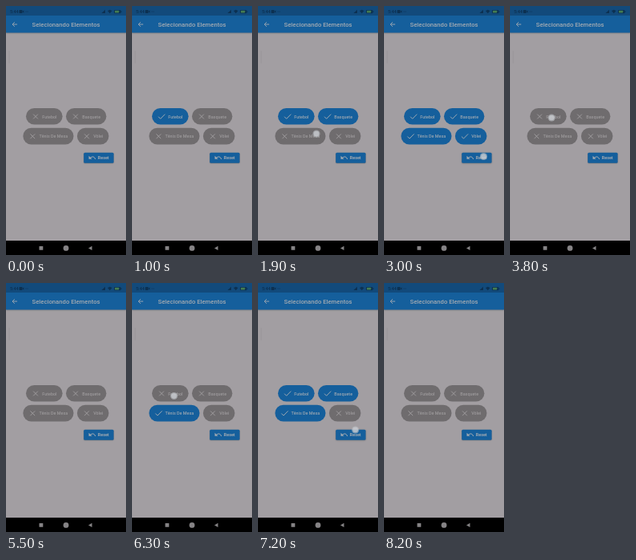
An HTML page with a canvas that plays this animation: 150x312 px, repeating every 8.3 s.

```html
<!DOCTYPE html>
<html lang="pt">
<head>
<meta charset="utf-8">
<style>
html, body { margin: 0; width: 100%; height: 100%; overflow: hidden; background: #a29ea2; }
canvas { display: block; width: 150px; height: 312px; }
</style>
</head>
<body>
<canvas id="stage"></canvas>
<script>
const LOOP = 8300, STEP = 100, FADE = 200;
const BLUE = [21, 95, 156], GREY = [111, 108, 110], PALE = '#a2aab2';
const canvas = document.getElementById('stage');
const ctx = canvas.getContext('2d');
const ratio = window.devicePixelRatio || 1;
canvas.width = 150 * ratio;
canvas.height = 312 * ratio;

// on/off: times at which each chip is switched
const chips = [
  { label: 'Futebol', x: 25, y: 128, w: 45.6, on: [600, 3900, 6400], off: [3100, 5400, 7300] },
  { label: 'Basquete', x: 75, y: 128, w: 50.4, on: [1400, 6800], off: [3100, 7300] },
  { label: 'Tênis De Mesa', x: 21.3, y: 152.8, w: 63.2, on: [2100, 5800], off: [3100, 7300] },
  { label: 'Vôlei', x: 88.9, y: 152.8, w: 39.6, on: [2400, 4400], off: [3100, 5400] },
];

const taps = [
  { x: 52, y: 140, from: 400, to: 700 },
  { x: 101, y: 140, from: 1300, to: 1500 },
  { x: 73, y: 160, from: 1900, to: 2200 },
  { x: 110, y: 163, from: 2300, to: 2500 },
  { x: 124.5, y: 188.5, from: 2900, to: 3200, reset: true },
  { x: 52, y: 140, from: 3800, to: 4000 },
  { x: 110, y: 163, from: 4300, to: 4500 },
  { x: 122, y: 187, from: 5200, to: 5500, reset: true },
  { x: 65, y: 162, from: 5700, to: 5900 },
  { x: 52.5, y: 141.5, from: 6300, to: 6500 },
  { x: 101, y: 140, from: 6700, to: 6900 },
  { x: 121.7, y: 184, from: 7100, to: 7400, reset: true },
  { x: 121.5, y: 273, from: 7900, to: 8200 },
];

const rgb = c => `rgb(${c.map(Math.round).join(',')})`;
const mix = (a, b, k) => a.map((v, i) => v + (b[i] - v) * k);

function box(x, y, w, h, r, fill) {
  ctx.fillStyle = fill;
  ctx.beginPath();
  ctx.roundRect(x, y, w, h, r);
  ctx.fill();
}

function line(points, color, width) {
  ctx.strokeStyle = color;
  ctx.lineWidth = width;
  ctx.beginPath();
  points.forEach(([x, y], i) => i ? ctx.lineTo(x, y) : ctx.moveTo(x, y));
  ctx.stroke();
}

function shape(points, fill) {
  ctx.fillStyle = fill;
  ctx.beginPath();
  points.forEach(([x, y]) => ctx.lineTo(x, y));
  ctx.fill();
}

function disc(x, y, r, fill) {
  ctx.fillStyle = fill;
  ctx.beginPath();
  ctx.arc(x, y, r, 0, Math.PI * 2);
  ctx.fill();
}

function text(str, x, y, size, weight, color) {
  ctx.font = `${weight} ${size}px Roboto, sans-serif`;
  ctx.fillStyle = color;
  ctx.fillText(str, x, y);
}

function withShadow(blur, dy, color, draw) {
  ctx.save();
  ctx.shadowColor = color;
  ctx.shadowBlur = blur * ratio;
  ctx.shadowOffsetY = dy * ratio;
  draw();
  ctx.restore();
}

function drawStatus() {
  box(0, 0, 150, 12, 0, '#124a7b');
  const ink = '#0c3051';
  text('5:44', 5, 9, 5.4, 500, ink);
  box(16.5, 5, 4, 4, 0.8, ink);
  shape([[20.5, 7], [22.3, 5.3], [22.3, 8.7]], ink);
  for (const x of [25, 27]) disc(x, 7, 0.5, ink);
  shape([[119.5, 9], [124, 9], [124, 4.8]], ink);
  shape([[127, 6], [129.8, 4.7], [132.6, 6], [129.8, 9.2]], ink);
  box(135, 5, 8.5, 4.2, 1, ink);
  box(136, 5.8, 5.2, 2.6, 0.4, '#447d52');
  box(143.5, 6.3, 0.9, 1.6, 0, ink);
}

function drawBar() {
  withShadow(2, 0.5, 'rgba(0,0,0,.25)', () => box(0, 12, 150, 21.6, 0, rgb(BLUE)));
  drawStatus();
  line([[14, 23], [8.2, 23]], PALE, 0.9);
  line([[10.8, 20.2], [8, 23], [10.8, 25.8]], PALE, 0.9);
  text('Selecionando Elementos', 32.6, 25.8, 7.7, 500, PALE);
}

function amount(chip, t) {
  const last = list => Math.max(-1, ...list.filter(v => v <= t));
  const on = last(chip.on), off = last(chip.off);
  if (on === off) return 0;
  const k = Math.min(1, (t - Math.max(on, off) + STEP) / FADE);
  return on > off ? k : 1 - k;
}

function drawChip(chip, t) {
  const k = amount(chip, t), { x, y, w } = chip;
  box(x, y, w, 20.6, 10.3, rgb(mix(GREY, BLUE, k)));
  const ink = rgb(mix([157, 154, 156], [155, 167, 178], k));
  const cx = x + 12, cy = y + 10.5;
  if (k >= 0.5) {
    line([[cx - 4, cy + 0.2], [cx - 1.4, cy + 2.8], [cx + 4.2, cy - 2.9]], ink, 1);
  } else {
    line([[cx - 2.9, cy - 2.9], [cx + 2.9, cy + 2.9]], ink, 1);
    line([[cx + 2.9, cy - 2.9], [cx - 2.9, cy + 2.9]], ink, 1);
  }
  text(chip.label, x + 20.3, y + 12.6, 5.4, 500, ink);
}

function drawReset(pressed) {
  withShadow(pressed ? 2 : 1.2, 0.5, 'rgba(0,0,0,.3)', () =>
    box(97.2, 183.8, 37.4, 13, 1.5, rgb(BLUE)));
  shape([[103.5, 187.8], [103.5, 191.8], [107.5, 191.8]], PALE);
  ctx.strokeStyle = PALE;
  ctx.lineWidth = 1;
  ctx.beginPath();
  ctx.moveTo(105, 190.5);
  ctx.quadraticCurveTo(109.8, 186.6, 111.7, 192);
  ctx.stroke();
  text('Reset', 114.8, 192.3, 5.4, 700, PALE);
}

function drawNav() {
  box(0, 294, 150, 18, 0, '#000');
  const ink = '#858385';
  box(41.5, 301, 4.8, 4.8, 0.5, ink);
  disc(75, 303.4, 3.4, ink);
  shape([[103, 303.4], [107.5, 300.7], [107.5, 306.1]], ink);
}

function drawTouch(tap) {
  disc(tap.x, tap.y, 4.6, 'rgba(190,193,198,.6)');
  disc(tap.x, tap.y, 3.3, 'rgba(205,208,212,.65)');
}

function draw(now) {
  const t = Math.floor(now % LOOP / STEP) * STEP;
  const tap = taps.find(p => t >= p.from && t < p.to);
  ctx.setTransform(ratio, 0, 0, ratio, 0, 0);
  box(0, 0, 150, 312, 0, '#a29ea2');
  box(3.5, 56, 1, 16, 0, '#979398');
  drawBar();
  chips.forEach(chip => drawChip(chip, t));
  drawReset(tap && tap.reset);
  drawNav();
  if (tap) drawTouch(tap);
}

const start = performance.now();
function tick() {
  draw(performance.now() - start);
  requestAnimationFrame(tick);
}
tick();
</script>
</body>
</html>
```
